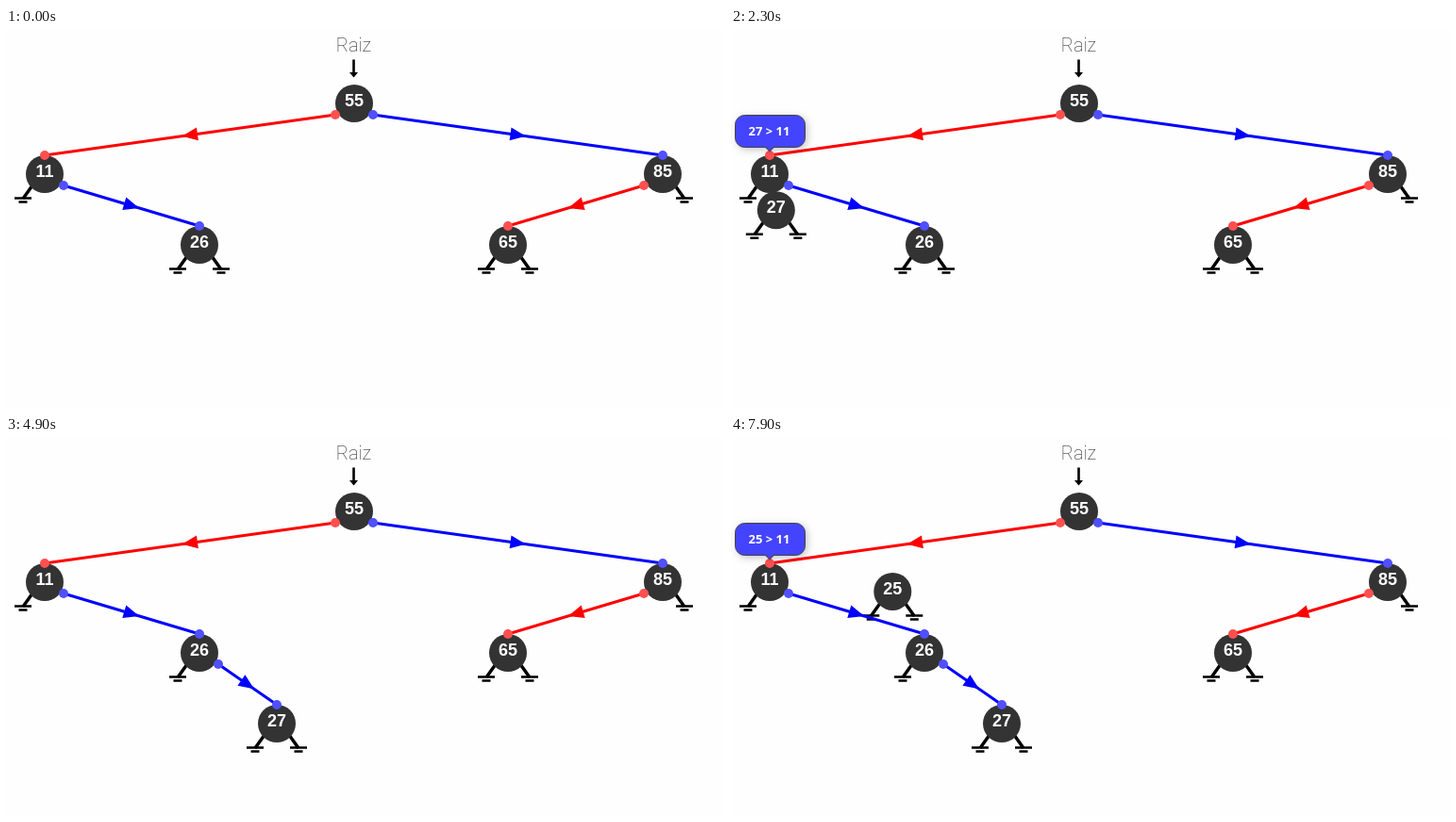
Write an HTML page with a canvas that moves like this. It is 762 px wide and 403 px high and loops after 8000 ms.

```html
<!DOCTYPE html>
<html lang="pt">
<head>
<meta charset="utf-8">
<title>Árvore binária</title>
<style>
  html, body { margin: 0; width: 100%; height: 100%; overflow: hidden; background: #fefefe; }
  canvas { display: block; }
</style>
</head>
<body>
<canvas id="stage" width="762" height="403"></canvas>
<script>
const ctx = document.getElementById('stage').getContext('2d');
const LOOP = 8000, STEP = 100, MOVE = 1000;
const RED = { line: '#ff0000', dot: '#ff5050', box: '#ff4444' };
const BLUE = { line: '#0000ff', dot: '#5050ff', box: '#4444ff' };

const node = (value, x, y) => ({ value, x, y });
const root = node(55, 369, 80);
const n11 = node(11, 41, 155);
const n85 = node(85, 696, 155);
const n26 = node(26, 205, 230);
const n65 = node(65, 532, 230);
const n27 = node(27, 287, 305);
const links = [
  { from: root, to: n11, side: -1 },
  { from: root, to: n85, side: 1 },
  { from: n11, to: n26, side: 1 },
  { from: n85, to: n65, side: -1 },
];
const newLink = { from: n26, to: n27, side: 1 };
const LINK_TIME = 4900;

// Each hop: visible from `at`, already `lead` ms into its easing.
const entry = [-80, 20];
const below = n => [n.x - 1, n.y + 40];
const hops = [
  { at: 500, lead: 100, value: 27, from: entry, to: below(root), target: root },
  { at: 1600, lead: 102, value: 27, from: below(root), to: below(n11), target: n11 },
  { at: 2800, lead: 165, value: 27, from: below(n11), to: below(n26), target: n26 },
  { at: 3900, lead: 150, value: 27, from: below(n26), to: [n27.x, n27.y], end: LINK_TIME },
  { at: 6500, lead: 65, value: 25, from: entry, to: below(root), target: root },
  { at: 7600, lead: 47, value: 25, from: below(root), to: below(n11), target: n11 },
];

// cubic-bezier(.25, .1, .25, 1)
function ease(t) {
  if (t <= 0) return 0;
  if (t >= 1) return 1;
  const curve = (a, b, u) => 3 * (1 - u) ** 2 * u * a + 3 * (1 - u) * u * u * b + u ** 3;
  let lo = 0, hi = 1;
  for (let i = 0; i < 24; i++) {
    const mid = (lo + hi) / 2;
    if (curve(0.25, 0.25, mid) < t) lo = mid; else hi = mid;
  }
  return curve(0.1, 1, lo);
}

function line(x1, y1, x2, y2, width, color) {
  ctx.beginPath();
  ctx.moveTo(x1, y1);
  ctx.lineTo(x2, y2);
  ctx.lineWidth = width;
  ctx.strokeStyle = color;
  ctx.stroke();
}

function disc(x, y, r, color) {
  ctx.beginPath();
  ctx.arc(x, y, r, 0, Math.PI * 2);
  ctx.fillStyle = color;
  ctx.fill();
}

function triangle(points, color) {
  ctx.beginPath();
  for (const [x, y] of points) ctx.lineTo(x, y);
  ctx.closePath();
  ctx.fillStyle = color;
  ctx.fill();
}

function label(text, x, y, font, color) {
  ctx.font = font;
  ctx.fillStyle = color;
  ctx.textAlign = 'center';
  ctx.fillText(text, x, y);
}

function drawGround(x, y, side) {
  line(x + side * 13, y + 12, x + side * 23, y + 26, 3.5, '#000');
  line(x + side * 14, y + 25.5, x + side * 32, y + 25.5, 2.5, '#000');
  line(x + side * 18.5, y + 29.5, x + side * 27.5, y + 29.5, 2.5, '#000');
}

function drawNode({ value, x, y }, used) {
  for (const side of [-1, 1]) {
    if (!used.some(l => l.from.value === value && l.side === side)) drawGround(x, y, side);
  }
  disc(x, y, 20, '#333');
  label(value, x, y + 3, 'bold 18px "Liberation Sans", Arial, sans-serif', '#fff');
}

function drawLink({ from, to, side }) {
  const { line: color, dot } = side < 0 ? RED : BLUE;
  const x1 = from.x + side * 20, y1 = from.y + 12;
  const x2 = to.x, y2 = to.y - 20;
  line(x1, y1, x2, y2, 3, color);
  ctx.save();
  ctx.translate((x1 + x2) / 2, (y1 + y2) / 2);
  ctx.rotate(Math.atan2(y2 - y1, x2 - x1));
  triangle([[8.5, 0], [-8, -7], [-8, 7]], color);
  ctx.restore();
  disc(x1, y1, 5, dot);
  disc(x2, y2, 5, dot);
}

function drawTitle() {
  label('Raiz', 368.5, 25, '100 20px Roboto, sans-serif', '#222');
  line(368.5, 33.5, 368.5, 48, 2.6, '#000');
  triangle([[364, 47], [373, 47], [368.5, 52.5]], '#000');
}

function drawPopup(value, { value: other, x, y }) {
  const less = value < other;
  const fill = (less ? RED : BLUE).box;
  const left = x - 36.5, top = y - 62.5, bottom = top + 34;
  ctx.save();
  ctx.shadowColor = 'rgba(0,0,0,.25)';
  ctx.shadowBlur = 8;
  ctx.shadowOffsetX = ctx.shadowOffsetY = 2;
  ctx.beginPath();
  ctx.roundRect(left, top, 74, 34, 10);
  ctx.fillStyle = fill;
  ctx.fill();
  ctx.restore();
  ctx.lineWidth = 1;
  ctx.strokeStyle = '#444';
  ctx.stroke();
  triangle([[x - 5, bottom], [x + 5, bottom], [x, bottom + 5]], '#444');
  triangle([[x - 4.5, bottom - 1], [x + 4.5, bottom - 1], [x, bottom + 3.5]], fill);
  label(`${value} ${less ? '<' : '>'} ${other}`, x - 0.5, y - 41,
    'bold 13px "Open Sans", sans-serif', '#fff');
}

function draw(time) {
  const linked = time >= LINK_TIME;
  const used = linked ? [...links, newLink] : links;
  const hop = hops.filter(h => time >= h.at && time < (h.end || LOOP)).pop();
  const active = hop && !(linked && hop.value === 27);

  ctx.fillStyle = '#fefefe';
  ctx.fillRect(0, 0, 762, 403);
  drawTitle();
  for (const n of [root, n11, n85, n26, n65]) drawNode(n, used);
  if (linked) drawNode(n27, used);
  if (active) {
    const p = ease((time - hop.at + hop.lead) / MOVE);
    const [x, y] = hop.from.map((a, i) => a + (hop.to[i] - a) * p);
    drawNode(node(hop.value, x, y), used);
  }
  used.forEach(drawLink);
  if (active && hop.target) drawPopup(hop.value, hop.target);
}

const start = performance.now();
function tick() {
  const time = (performance.now() - start) % LOOP;
  draw(Math.floor(time / STEP) * STEP);
  requestAnimationFrame(tick);
}
tick();
</script>
</body>
</html>
```
